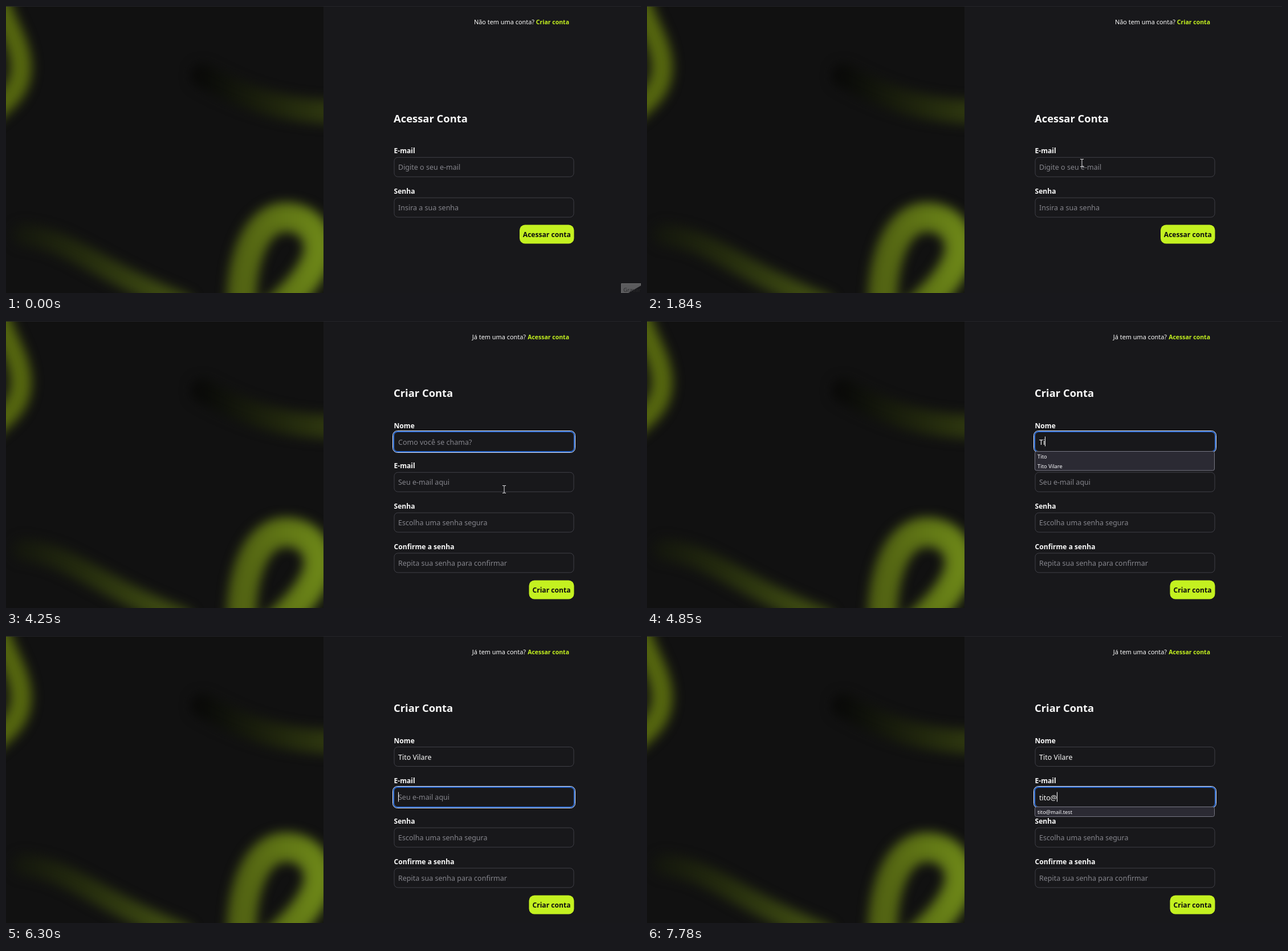
Recreate the animation shown at these times as an HTML page. Size 1114 px wide and 503 px high, loop 8000 ms.

```html
<!DOCTYPE html>
<html lang="pt-BR">
<head>
<meta charset="utf-8">
<title>Acessar conta</title>
<style>
  html, body { margin: 0; width: 100%; height: 100%; overflow: hidden; background: #18181b; }
  svg { display: block; width: 1114px; height: 503px; }
  text { font: 12.5px "Noto Sans", "Open Sans", sans-serif; fill: #fafafa; white-space: pre; }
  .title { font-size: 18.4px; font-weight: 700; }
  .label, .action { font-size: 12.1px; font-weight: 600; }
  .action { fill: #0d0d0f; text-anchor: middle; }
  .hint { fill: #85858c; }
  .ask { font-size: 10.9px; text-anchor: end; }
  .link { font-size: 10.5px; font-weight: 600; fill: #c4f120; text-anchor: end; }
  .option { font-size: 9.4px; fill: #fbfbfe; }
  .box { fill: #18181b; stroke: #3f3f46; }
  .glow path { fill: none; stroke-linecap: round; }
  .pointer path { fill: #fff; stroke: #000; stroke-width: 1; }
  #beam path { fill: none; stroke: #e4e4e7; }
</style>
</head>
<body>
<svg viewBox="0 0 1114 503">
  <defs>
    <filter id="soft" filterUnits="userSpaceOnUse" x="-80" y="-80" width="760" height="700"
            color-interpolation-filters="sRGB"><feGaussianBlur stdDeviation="9.5"/></filter>
    <clipPath id="left"><path d="M0 1H557V503H0Z"/></clipPath>
    <linearGradient id="trail" gradientUnits="userSpaceOnUse" x1="335" x2="557">
      <stop stop-color="#090908"/><stop offset=".2" stop-color="#0f110b"/><stop offset="1" stop-color="#2d360f"/>
    </linearGradient>
    <linearGradient id="wave" gradientUnits="userSpaceOnUse" x1="10" x2="270">
      <stop stop-color="#13150e"/><stop offset=".45" stop-color="#232a0e"/><stop offset="1" stop-color="#3d4a12"/>
    </linearGradient>
    <linearGradient id="ring" gradientUnits="userSpaceOnUse" x1="395" x2="557">
      <stop stop-color="#4f5f12"/><stop offset="1" stop-color="#6d8718"/>
    </linearGradient>
  </defs>

  <g clip-path="url(#left)">
    <path d="M0 0H557V503H0Z" fill="#111"/>
    <g class="glow" filter="url(#soft)">
      <path d="M-14 -10C0 35 26 66 26 108C26 145 2 165 -24 186" stroke="#55660f" stroke-width="38"/>
      <path d="M345 122C400 152 475 187 590 186" stroke="url(#trail)" stroke-width="42"/>
      <path d="M30 401C115 410 155 462 310 522" stroke="url(#wave)" stroke-width="38"/>
      <path d="M414 540C408 470 430 369 492 370C538 371 560 412 541 452C526 485 496 512 466 540"
            stroke="url(#ring)" stroke-width="51"/>
    </g>
  </g>
  <path d="M0 .5H1114" stroke="#242429"/>

  <g id="signIn"></g>
  <g id="signUp"></g>

  <g id="focus" fill="none">
    <rect x="678.5" y="-1.5" width="320" height="38" rx="8" stroke="#e3ecff"/>
    <rect x="680" y="0" width="317" height="35" rx="6.5" stroke="#2563c9" stroke-width="2"/>
  </g>
  <text id="name" x="688" y="216.5"></text>
  <text id="email" x="688" y="287.5"></text>
  <path id="caret" d="M.5 0V17" stroke="#fff"/>
  <g id="options"></g>

  <g id="tip">
    <path d="M1079.5 510V486.5H1120" fill="#5b5b5d" stroke="#6a6a6c"/>
    <text x="1083" y="500.5" style="font-size:9.6px;fill:#29292b">Gravar</text>
  </g>

  <g id="arrow" class="pointer"><path d="M.5 .5V16L4 12.7L6.5 18.5L9 17.5L6.6 11.8H11.5Z"/></g>
  <g id="hand" class="pointer"><path d="M-1.5 13V2Q0 -.5 1.5 2V8Q4 6 5 8.5Q7.5 7 8.5 9.5Q11 8.500 11.500 11V16L9.500 21.500H0L-4.500 14Q-4 11 -1.500 13Z"/></g>
  <g id="beam"><path d="M-3 -6.500H-1L0 -6L1 -6.500H3M0 -6V6M-3 6.500H-1L0 6L1 6.500H3"/></g>
</svg>

<script>
const $ = id => document.getElementById(id);
const LOOP = 8000;
const fieldTop = { name: 194, email: 265 };

const label = (cls, x, y, value) => `<text class="${cls}" x="${x}" y="${y}">${value}</text>`;

function field(caption, hint, row, id = '') {
  const y = 194.5 + row * 70.8;
  return label('label', 680.5, y + 62.3 - 70.8 + 1.2 + 0.3, caption) + // caption sits above its box
    `<rect class="box" x="681" y="${y}" width="315" height="34" rx="6.5"/>` +
    `<g id="${id}">${label('hint', 688, y + 22, hint)}</g>`;
}

function page({ ask, askX, link, title, titleY, fields, action, left, top }) {
  return label('ask', askX, 31.5, ask) + label('link', 988, 31.5, link) +
    label('title', 680, titleY, title) + fields +
    `<rect x="${left}" y="${top}" width="${996.5 - left}" height="33" rx="9.5" fill="#c4f120"/>` +
    label('action', (left + 996.5) / 2, top + 21.5, action);
}

$('signIn').innerHTML = page({
  ask: 'Não tem uma conta?', askX: 927, link: 'Criar conta',
  title: 'Acessar Conta', titleY: 204,
  fields: field('E-mail', 'Digite o seu e-mail', 1) + field('Senha', 'Insira a sua senha', 2),
  action: 'Acessar conta', left: 901, top: 383.5
});
$('signUp').innerHTML = page({
  ask: 'Já tem uma conta?', askX: 912, link: 'Acessar conta',
  title: 'Criar Conta', titleY: 133,
  fields: field('Nome', 'Como você se chama?', 0, 'nameHint') +
    field('E-mail', 'Seu e-mail aqui', 1, 'emailHint') +
    field('Senha', 'Escolha uma senha segura', 2) +
    field('Confirme a senha', 'Repita sua senha para confirmar', 3),
  action: 'Criar conta', left: 917.5, top: 454.5
});

const saved = {
  name: ['Tito', 'Tito Vilare'],
  email: ['tatap', 'tito', 'tip', 'novo', 'conta', 'abc'].map(user => user + '@mail.test')
};

// Each entry changes part of the form state from its time on.
const steps = [
  [0, { page: 'signIn', tip: true, focus: '', caret: true, name: '', email: '', query: null }],
  [70, { tip: false }],
  [3030, { page: 'signUp' }],
  [3710, { focus: 'name' }],
  [4250, { caret: false }],
  [4580, { caret: true }],
  ...typing('name', 'Tito Vilare', [4580, 4780, 4980, 5110, 5370, 5440, 5640, 5770, 5900, 6030, 6100]),
  [6300, { focus: 'email', query: null }],
  [6370, { query: '' }],
  [6830, { email: 't' }],
  [6900, { query: 't' }],
  ...typing('email', 'tito@', [6900, 7030, 7160, 7250, 7780])
];

function typing(key, value, times) {
  return times.map((time, i) => {
    const typed = value.slice(0, i + 1);
    return [time, { [key]: typed, query: typed }];
  });
}

const path = [
  [470, 1061, 478, 'arrow'], [540, 1052, 420, 'arrow'], [610, 1035, 330, 'arrow'],
  [680, 1010, 235, 'arrow'], [750, 985, 150, 'arrow'], [820, 960, 85, 'arrow'],
  [890, 942, 42, 'arrow'], [960, 932, 17, 'hand'], [1030, 938, 22, 'hand'], [1100, 943, 25, 'hand'],
  [1490, 935, 34, 'arrow'], [1560, 900, 85, 'arrow'], [1630, 850, 160, 'arrow'],
  [1700, 805, 222, 'arrow'], [1770, 775, 257, 'arrow'], [1840, 763, 275, 'beam'],
  [3440, 764, 258, 'beam'], [3500, 766, 232, 'beam'], [3560, 768, 220, 'beam'],
  [3780, 776, 228, 'beam'], [3850, 815, 258, 'beam'], [3910, 858, 284, 'beam'],
  [3980, 874, 295, 'beam'], [4580, 0, 0, '']
];

const show = (id, on) => $(id).style.display = on ? '' : 'none';
const move = (id, x, y) => $(id).setAttribute('transform', `translate(${x} ${y})`);

function drawOptions({ focus, query }) {
  const list = query === null ? [] : saved[focus].filter(item => item.startsWith(query));
  const top = fieldTop[focus] + 34.5;
  $('options').innerHTML = list.length
    ? `<rect x="680.5" y="${top}" width="315" height="${list.length * 16.5 + 0.5}" rx="3" fill="#2b2a33" stroke="#777783"/>` +
      list.map((item, i) => label('option', 685, top + 12.6 + i * 16.5, item)).join('')
    : '';
}

function drawForm(state) {
  const { focus } = state;
  for (const id of ['signIn', 'signUp']) show(id, state.page === id);
  for (const id of ['name', 'email']) {
    $(id).textContent = state[id];
    show(id + 'Hint', !state[id]);
  }
  show('tip', state.tip);
  show('focus', focus);
  show('caret', focus && state.caret);
  if (focus) {
    move('focus', 0, fieldTop[focus]);
    const width = state[focus] ? $(focus).getComputedTextLength() : 0;
    move('caret', 688 + Math.round(width), fieldTop[focus] + 8.5);
  }
  drawOptions(state);
}

function drawPointer(t) {
  const [, x, y, kind] = path.filter(point => point[0] <= t).pop() || [];
  for (const id of ['arrow', 'hand', 'beam']) show(id, id === kind);
  if (kind) move(kind, x, y);
}

const start = performance.now();
let drawn = -1;

function frame() {
  const t = (performance.now() - start) % LOOP;
  const past = steps.filter(([time]) => time <= t);
  if (past.length !== drawn) {
    drawn = past.length;
    drawForm(Object.assign({}, ...past.map(([, change]) => change)));
  }
  drawPointer(t);
  requestAnimationFrame(frame);
}
frame();
</script>
</body>
</html>
```
